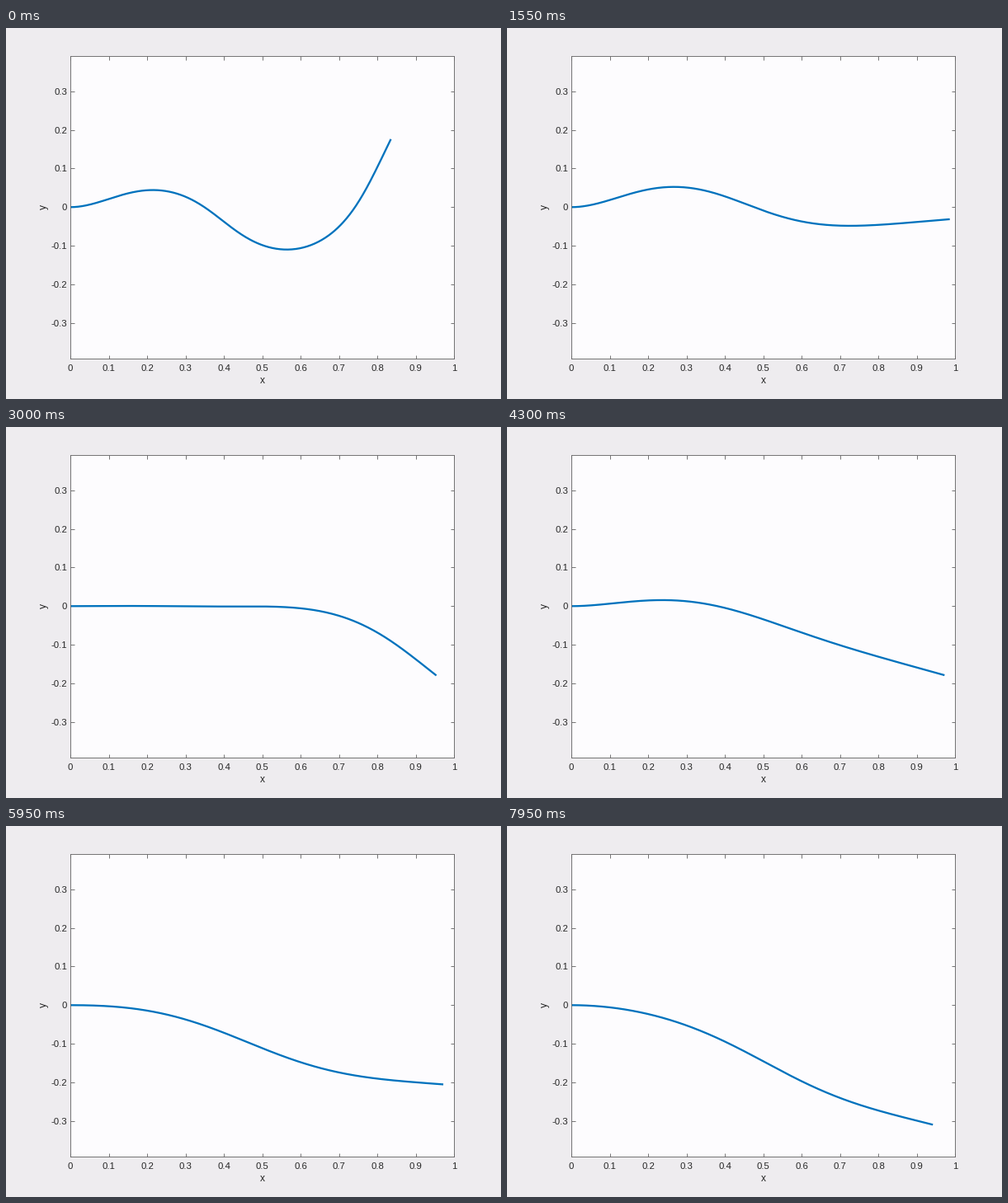
These frames come from a looping animation (600x450 px, 8 s). A matplotlib script:

```python
import numpy as np
import matplotlib.pyplot as plt
from matplotlib.animation import FuncAnimation

W, H, DPI = 600, 450, 100
INTERVAL, FRAMES = 50, 160
LEFT, RIGHT, TOP, BOTTOM = 78, 543, 34, 401
ZERO_Y, UNIT = 217.3, 468.5
INK, FRAME = "#262626", "#686868"

# Vibration modes of a clamped-free beam of length 1
S = np.linspace(0, 1, 301)


def mode_shape(b):
    sigma = (np.cosh(b) + np.cos(b)) / (np.sinh(b) + np.sin(b))
    z = b * S
    return (np.cosh(z) - np.cos(z) - sigma * (np.sinh(z) - np.sin(z))) / 2


SHAPES = np.array([mode_shape(b) for b in (1.875104, 4.694091, 7.854757, 10.995541)])
SLOPES = np.gradient(SHAPES, S, axis=1)


def integrate(f):
    return np.concatenate([[0], np.cumsum((f[1:] + f[:-1]) / 2)]) * S[1]


def swing(t, size, decay, period, phase=0):
    return size * np.exp(-decay * t) * np.cos(2 * np.pi * (t / period - phase))


def modes(t):
    """Modal amplitudes: a slow sag with damped vibrations on top."""
    sag = 0.02 - 0.0475 * t + 0.011 * (1 - np.cos(2 * np.pi * t / 7.5))
    return np.array([
        sag,
        0.10 * sag + swing(t, 0.135, 0.22, 1.27, 0.42),
        -0.03 * sag + swing(t, 0.10, 0.37, 0.395),
        0.01 * sag + 0.022 * np.exp(-0.35 * t),
    ])


def beam(t):
    q = modes(t)
    angle = q @ SLOPES
    length = 1 + 2.8 * q[2] ** 2
    return length * integrate(np.cos(angle)), length * integrate(np.sin(angle))


def px(n):
    return n * 72 / DPI


fig = plt.figure(figsize=(W / DPI, H / DPI), dpi=DPI, facecolor="#eeecef")
ax = fig.add_axes([LEFT / W, 1 - BOTTOM / H, (RIGHT - LEFT) / W, (BOTTOM - TOP) / H],
                  facecolor="#fdfcfe")
ax.set_xlim(0, 1)
ax.set_ylim((ZERO_Y - BOTTOM) / UNIT, (ZERO_Y - TOP) / UNIT)


def put(x, y, text, size, ha="center", va="baseline", **kw):
    fig.text(x / W, 1 - y / H, text, fontsize=px(size), color=INK,
             family="Liberation Sans", ha=ha, va=va, **kw)


x_ticks = np.arange(11) / 10
y_ticks = np.arange(-3, 4) / 10
ax.set_xticks(x_ticks)
ax.set_yticks(y_ticks)
ax.tick_params(direction="in", length=px(4.5), width=px(0.9), color=FRAME,
               top=True, right=True, labelbottom=False, labelleft=False)
for spine in ax.spines.values():
    spine.set(linewidth=px(0.9), edgecolor=FRAME)

for v in x_ticks:
    put(LEFT + v * (RIGHT - LEFT), 416, f"{v:g}", 11.4)
for v in y_ticks:
    put(74, ZERO_Y - v * UNIT + 4, f"{v:g}", 11.4, ha="right")
put(310.5, 431, "x", 12)
put(46, 217, "y", 12, va="center", rotation=90)

line, = ax.plot([], [], color="#0072bd", lw=px(2.3), solid_capstyle="butt")


def draw(i):
    line.set_data(*beam(i * INTERVAL / 1000))
    return line,


anim = FuncAnimation(fig, draw, frames=FRAMES, interval=INTERVAL, repeat=True)
plt.show()
```
